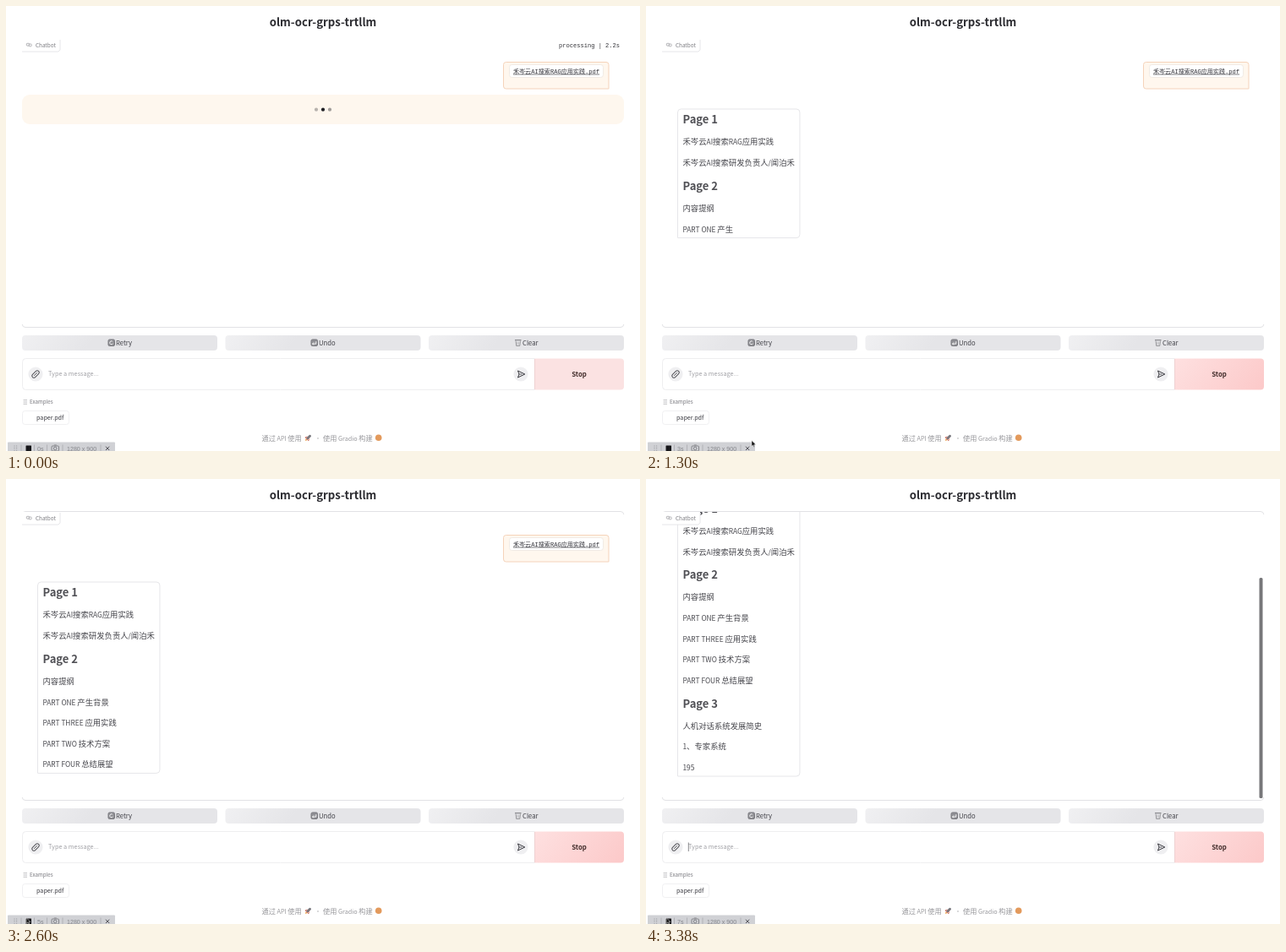
An HTML page with a canvas that plays this animation: 750 px wide and 527 px high, repeating every 3.51 s.

```html
<!DOCTYPE html>
<html lang="zh">
<head>
<meta charset="utf-8">
<title>olm-ocr-grps-trtllm</title>
<style>
  html, body { margin: 0; width: 100%; height: 100%; overflow: hidden; background: #fff; }
  canvas { display: block; width: 750px; height: 527px; }
</style>
</head>
<body>
<canvas id="stage"></canvas>
<script>
const W = 750, H = 527, LOOP = 3510, STEP = 130;
const SANS = '"Noto Sans CJK SC", "Noto Sans CJK", "Noto Sans CJK JP", sans-serif';
const MONO = '"Liberation Mono", "Noto Sans CJK SC", "Noto Sans CJK JP", monospace';
const ARIAL = '"Liberation Sans", sans-serif';
const LATIN = 0.89; // Latin runs are set smaller than the Chinese ones
const SCROLL_AT = 3120, PANEL_TOP = 39, PANEL_BOTTOM = 380, LAST_LINE = 341.5;

// Streamed answer: each page starts at a time and adds tokens at a rate per step.
const pages = [
  { at: 260, rate: 5, text: '禾岑|云|AI|搜索|RAG|应用|实践|\n|禾岑|云|AI|搜索|研发|负责人|/|闻|泊|禾' },
  { at: 1040, rate: 3, text: '内容|提纲|\n|PART| ONE| 产生|背景|\n|PART| THREE| 应用|实践|\n|PART| TWO| 技术|方案|\n|PART| FOUR| 总结|展望' },
  { at: 2990, rate: 5, text: '人机|对话|系统|发展|简史|\n|1|、|专家|系统|\n|195' }
];

const canvas = document.getElementById('stage');
const c = canvas.getContext('2d');
const dpr = window.devicePixelRatio || 1;
canvas.width = W * dpr;
canvas.height = H * dpr;

function text(s, x, y, size, color, { weight = 400, align = 'left', family = SANS } = {}) {
  c.font = `${weight} ${size}px ${family}`;
  c.fillStyle = color;
  c.textAlign = align;
  c.fillText(s, x, y + size * 0.37);
}

// Draws (or only measures) Chinese and Latin runs on one line; returns the end.
function mixed(s, x, y, size, color, draw = true) {
  for (const run of s.match(/[\u3000-\u9fff]+|[^\u3000-\u9fff]+/g) || []) {
    const px = /[\u3000-\u9fff]/.test(run) ? size : size * LATIN;
    c.font = `400 ${px}px ${SANS}`;
    if (draw) {
      c.fillStyle = color;
      c.textAlign = 'left';
      c.fillText(run, x, y + size * 0.37);
    }
    x += c.measureText(run).width;
  }
  return x;
}

function box(x, y, w, h, r, fill, stroke) {
  c.beginPath();
  c.roundRect(x, y, w, h, r);
  if (fill) { c.fillStyle = fill; c.fill(); }
  if (stroke) { c.strokeStyle = stroke; c.lineWidth = 1; c.stroke(); }
}

function dot(x, y, r, color) {
  c.beginPath();
  c.arc(x, y, r, 0, Math.PI * 2);
  c.fillStyle = color;
  c.fill();
}

function path(points, color, width = 0.8, close = false, fill) {
  c.beginPath();
  points.forEach(([x, y], i) => i ? c.lineTo(x, y) : c.moveTo(x, y));
  if (close) c.closePath();
  if (fill) { c.fillStyle = fill; c.fill(); }
  c.strokeStyle = color;
  c.lineWidth = width;
  c.stroke();
}

function gradient(x0, y0, x1, y1, a, b) {
  const g = c.createLinearGradient(x0, y0, x1, y1);
  g.addColorStop(0, a);
  g.addColorStop(1, b);
  return g;
}

function answer(t) {
  const rows = [];
  let y = 107.1;
  pages.forEach((page, i) => {
    if (t < page.at) return;
    rows.push({ s: 'Page ' + (i + 1), y: y += 27.4, head: true });
    const count = Math.floor((t - page.at) / STEP * page.rate);
    const shown = page.text.split('|').slice(0, count).join('');
    if (!shown) return;
    shown.split('\n').forEach((s, k) => rows.push({ s, y: y += k ? 24.6 : 26.5 }));
  });
  return rows;
}

function drawAnswer(rows) {
  const ends = rows.map(r => {
    if (!r.head) return mixed(r.s, 43.5, 0, 9.375, '', false);
    c.font = `600 13px ${SANS}`;
    return 43.5 + c.measureText(r.s).width;
  });
  const last = rows[rows.length - 1];
  const bottom = last.y + (last.head ? 18 : 10.5);
  box(37.5, 122, Math.max(...ends) - 31.5, bottom - 122, [4, 4, 4, 0], '#fff', '#e6e6e9');
  for (const r of rows) {
    if (r.head) text(r.s, 43.5, r.y, 13, '#505055', { weight: 600 });
    else mixed(r.s, 43.5, r.y, 9.375, '#46464c');
  }
}

function drawUpload() {
  box(588.5, 66.5, 124.5, 31.5, [3, 3, 0, 3], '#fff7ee', '#f5d3ba');
  box(595.5, 69.5, 111, 15, 3, '#fff', '#f1ebe5');
  const name = '禾岑云AI搜索RAG应用实践.pdf';
  text(name, 651, 77, 7.1, '#33333a', { family: MONO, align: 'center' });
  const half = c.measureText(name).width / 2;
  path([[651 - half, 81], [651 + half, 81]], '#44444a', 0.7);
}

function drawPending(t) {
  box(19, 105, 712, 35, 9, '#fef7ee');
  for (let i = 0; i < 3; i++) {
    const level = 0.5 + 0.5 * Math.cos(2 * Math.PI * (t / 750 - (i - 1) / 3 + 0.02));
    dot(367 + 8 * i, 122.7, 2.1, `rgba(30,30,34,${0.15 + 0.85 * level})`);
  }
  text(`processing | ${(2.2 + t * 0.002).toFixed(1)}s`, 726, 46.5, 7.06, '#333338', { family: MONO, align: 'right' });
}

function drawPanel(t) {
  const edge = '#e2e2e5';
  const rows = answer(t);
  const scroll = t >= SCROLL_AT ? rows[rows.length - 1].y - LAST_LINE : 0;
  c.save();
  c.beginPath();
  c.rect(18, PANEL_TOP, 714, PANEL_BOTTOM - PANEL_TOP);
  c.clip();
  c.translate(0, -scroll);
  drawUpload();
  if (rows.length) drawAnswer(rows);
  c.restore();
  if (!rows.length) drawPending(t);

  c.strokeStyle = edge;
  c.lineWidth = 1;
  c.beginPath();
  c.moveTo(19.2, 377);
  c.quadraticCurveTo(19.5, 380.5, 23, 380.5);
  c.lineTo(727, 380.5);
  c.quadraticCurveTo(730.5, 380.5, 730.8, 377);
  if (t >= 1690) {
    c.moveTo(19.2, 42);
    c.quadraticCurveTo(19.5, 38.5, 23, 38.5);
    c.lineTo(727, 38.5);
    c.quadraticCurveTo(730.5, 38.5, 730.8, 42);
  }
  c.stroke();

  if (scroll) {
    const view = PANEL_BOTTOM - PANEL_TOP;
    const thumb = view * view / (view + scroll) - 3;
    box(725.5, 378 - thumb, 4, thumb, 1.5, '#77777a');
  }

  box(19, 39, 45, 15, [0, 0, 3, 0], '#fff');
  path([[19, 54], [62, 54], [64, 52], [64, 40]], '#e6e6e9', 1);
  box(24.3, 44.3, 3.4, 2.8, 0.8, null, '#b0b0b4');
  box(27, 45, 3.2, 2.8, 0.8, null, '#b8b8bc');
  text('Chatbot', 35, 46.7, 6.35, '#77777c');
}

function drawButtons() {
  const labels = [['Retry', 19, 121, 130], ['Undo', 259.5, 361, 370], ['Clear', 500, 602, 611]];
  for (const [label, x, icon, tx] of labels) {
    box(x, 390, 231, 18, 4, gradient(x, 390, x + 60, 430, '#f0f0f2', '#e5e5e8'));
    if (label === 'Clear') {
      path([[icon + 1, 396.5], [icon + 1.7, 402.5], [icon + 5.8, 402.5], [icon + 6.5, 396.5]], '#88888c');
      path([[icon, 395.7], [icon + 7.5, 395.7]], '#77777b', 1);
      for (const k of [2.8, 4.7]) path([[icon + k, 397.5], [icon + k, 401.5]], '#a0a0a4', 0.6);
    } else {
      box(icon, 395, 7.5, 7.5, 1.5, '#909095', '#77777c');
      c.beginPath();
      if (label === 'Retry') c.arc(icon + 3.75, 398.75, 2, 0.5, 5.4);
      else {
        c.moveTo(icon + 1.5, 400);
        c.lineTo(icon + 5.8, 400);
        c.lineTo(icon + 5.8, 397.3);
        c.moveTo(icon + 3, 398.5);
        c.lineTo(icon + 1.5, 400);
        c.lineTo(icon + 3, 401.5);
      }
      c.strokeStyle = '#fff';
      c.lineWidth = 0.9;
      c.stroke();
    }
    text(label, tx, 399, 7.7, '#424248');
  }
}

function drawInput(t) {
  box(19.5, 417.5, 606, 37, [4, 0, 0, 4], '#fff', '#eeeef0');
  dot(35, 436, 8.6, '#efeff1');
  c.save();
  c.translate(35, 436);
  c.rotate(Math.PI / 4);
  box(-2.2, -5, 4.4, 10, 2.2, null, '#55555b');
  path([[0, -2.5], [0, 2.7]], '#55555b', 0.9);
  c.restore();
  dot(609, 436, 8.6, '#efeff1');
  path([[605.5, 432], [613.8, 436], [605.5, 440], [607, 436]], '#3c3c42', 1, true);
  path([[607, 436], [610.5, 436]], '#3c3c42', 0.8);
  text('Type a message...', 50, 435.7, 7.3, '#a0a0a5');
  if (t >= SCROLL_AT) path([[50.3, 430.5], [50.3, 441]], '#55555a', 0.7);

  const fill = t < 1170 ? '#fbe2e2' : gradient(635, 405, 715, 467, '#fee0e0', '#fccaca');
  box(625.5, 417.5, 105.5, 37, [0, 4, 4, 0], fill);
  path([[625.5, 418], [625.5, 454]], '#edc9c9', 0.7);
  text('Stop', 678, 436.2, 7.8, '#402c2a', { weight: 600, align: 'center' });
}

function drawFooter() {
  for (let i = 0; i < 3; i++) {
    path([[20.5, 466.7 + 2.3 * i], [25, 466.7 + 2.3 * i]], '#a5a5aa', 0.7);
  }
  text('Examples', 28, 469, 6.2, '#75757b');
  box(19.5, 479.5, 55, 16, 3, '#fff', '#f0f0f2');
  text('paper.pdf', 36, 487.5, 7.2, '#3b3b42');

  mixed('通过 API 使用', 302.5, 511.5, 8.2, '#98989c');
  c.save();
  c.translate(357.5, 511.3);
  c.rotate(Math.PI / 4);
  box(-1.4, -4.3, 2.8, 6.8, 1.4, '#77777d');
  path([[-1.4, 0], [-2.8, 2.3], [2.8, 2.3], [1.4, 0]], '#c65b4c', 0.8);
  dot(0, 3.6, 1, '#e9a24c');
  c.restore();
  dot(369, 512, 0.7, '#98989c');
  mixed('使用 Gradio 构建', 375, 511.5, 8.2, '#98989c');
  dot(440.7, 511.3, 3.8, '#e39a5c');
}

function drawRecorder(t) {
  const ink = '#85868b';
  box(2, 516.5, 127, 11, [1, 1, 0, 0], '#d0d1d5');
  for (let i = 0; i < 6; i++) dot(10 + 2.6 * (i % 2), 521 + 2.5 * (i >> 1), 0.6, '#8e8f94');
  for (const x of [18, 33.5, 48.5, 67, 112]) path([[x, 519.5], [x, 527]], '#a6a7ac', 0.7);
  box(23.5, 520.5, 6.5, 6.5, 0.5, '#17171a');
  text(Math.floor(0.42 + t * 0.002) + 's', 37, 524, 7.1, ink, { family: ARIAL });
  box(54, 521, 8.5, 6, 1, null, ink);
  c.beginPath();
  c.arc(58.2, 524, 1.8, 0, Math.PI * 2);
  c.stroke();
  path([[56.8, 520], [59.8, 520]], ink, 1);
  text('1280 x 900', 72, 524, 7.1, ink, { family: ARIAL });
  path([[118, 521.7], [122.2, 526]], '#505056', 1);
  path([[122.2, 521.7], [118, 526]], '#505056', 1);
}

function drawPointer(t) {
  if (t < 1300) return;
  const p = Math.min(1, (t - 1300) / 650);
  const e = p * p * (3 - 2 * p);
  const x = 125 - 101 * e, y = 514.5 + 5 * e;
  const shape = [[0, 0], [0, 7], [1.6, 5.6], [2.7, 8], [3.7, 7.5], [2.7, 5.2], [4.8, 5]];
  path(shape.map(([dx, dy]) => [x + dx, y + dy]), '#fff', 0.5, true, '#111');
}

function draw(now) {
  let t = Math.floor((now % LOOP) / STEP) * STEP;
  if (t === 910) t = 780; // one longer hold
  c.setTransform(dpr, 0, 0, dpr, 0, 0);
  c.fillStyle = '#fff';
  c.fillRect(0, 0, W, H);
  text('olm-ocr-grps-trtllm', 375, 19.5, 13.2, '#2b2b30', { weight: 600, align: 'center' });
  drawPanel(t);
  drawButtons();
  drawInput(t);
  drawFooter();
  drawRecorder(t);
  drawPointer(t);
}

const start = performance.now();
function loop() {
  draw(performance.now() - start);
  requestAnimationFrame(loop);
}
loop();
</script>
</body>
</html>
```
